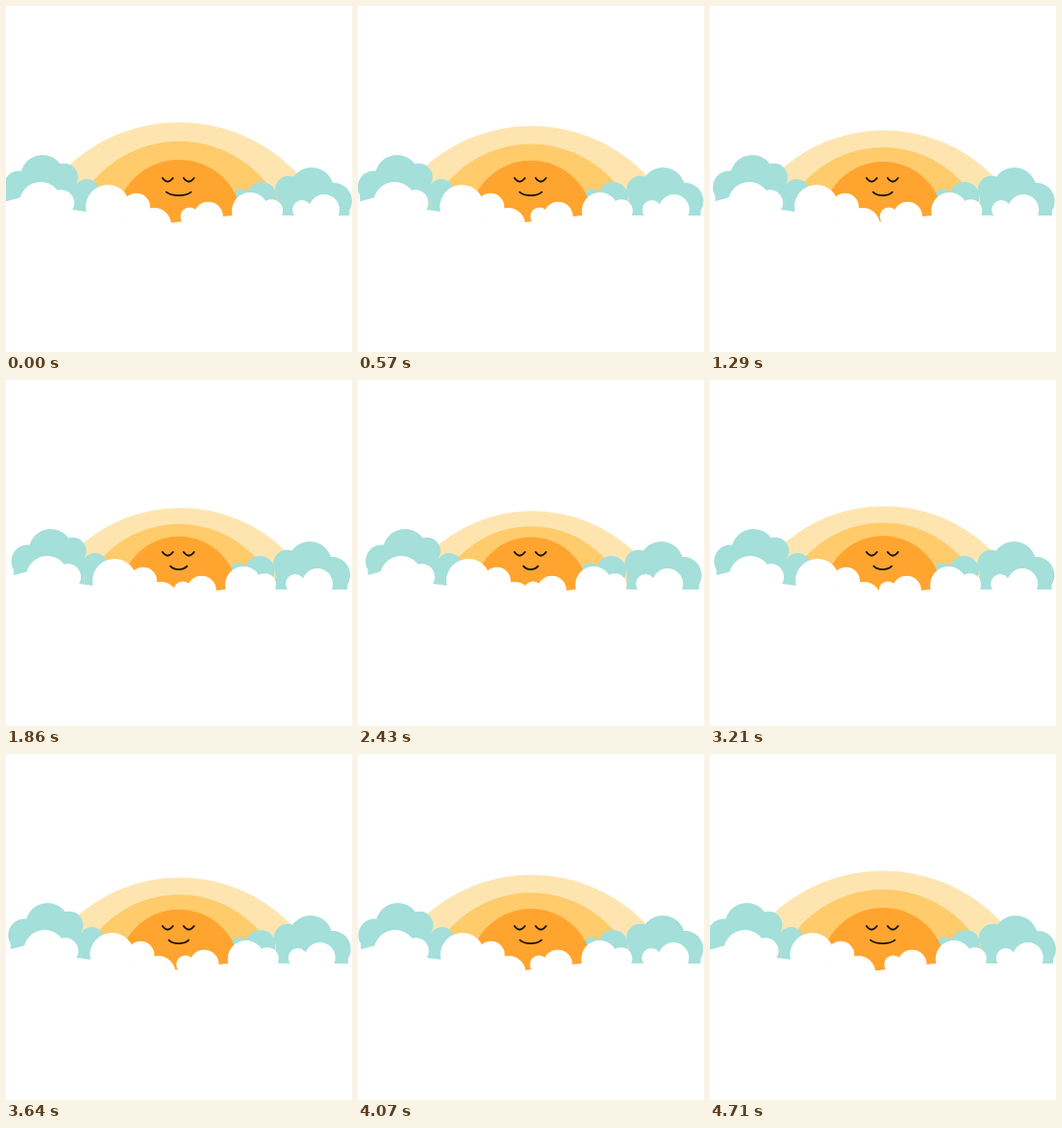
These frames come from a looping animation (360 by 360 pixels, 4.78 s). An HTML page:

```html
<!DOCTYPE html>
<html lang="en">
<head>
<meta charset="utf-8">
<title>Breathing sun</title>
<style>
  html, body { margin: 0; width: 100%; height: 100%; overflow: hidden; background: #fff; }
  svg { display: block; width: 100vw; height: 100vh; }
</style>
</head>
<body>
<svg viewBox="0 0 360 360">
  <circle id="halo" cy="290" fill="#fee5b0"/>
  <circle id="glow" cx="180" cy="258" fill="#ffcb6b"/>
  <g id="tealLeft" fill="#a4dfda"/>
  <g id="tealRight" fill="#a4dfda"/>
  <circle id="sun" cx="180" fill="#ffa42f"/>
  <g fill="none" stroke="#111" stroke-width="1.8" stroke-linecap="round">
    <path id="eye" d="M162.800 179q5.400 7.500 10.900 0"/>
    <use href="#eye" x="22"/>
    <path id="mouth"/>
  </g>
  <g id="whiteLeft" fill="#fff"><path d="M-40 214 18 198.500 69 212 172 226V400H-40Z"/></g>
  <g id="whiteRight" fill="#fff"><path d="M160 227 236 217.700 400 218V400H160Z"/></g>
  <path d="M0 227H360V360H0Z" fill="#fff"/>
</svg>
<script>
  const LOOP = 4780, STEPS = 67, FLOOR = 218;
  const SMALL = 0.62;   // radius of a side puff relative to its main puff
  const drift = { tealLeft: 11, tealRight: -2.5, whiteLeft: 9, whiteRight: -9 };

  const el = id => document.getElementById(id);
  const mix = (a, b, p) => a + (b - a) * p;

  function set(node, attrs) {
    for (const name in attrs) node.setAttribute(name, attrs[name]);
  }

  function add(id, tag, attrs) {
    const node = document.createElementNS("http://www.w3.org/2000/svg", tag);
    set(node, attrs);
    el(id).append(node);
  }

  // Teal puffs also fill the space down to the floor.
  function puff(id, x, y, r) {
    add(id, "circle", { cx: x, cy: y, r });
    if (id.startsWith("teal")) {
      add(id, "rect", { x: x - r * 0.85, y, width: r * 1.7, height: FLOOR - y });
    }
  }

  // A main puff and a side puff whose far edge lies "reach" away from the main centre.
  function pair(id, x, y, r, reach) {
    const small = r * SMALL;
    puff(id, x, y, r);
    puff(id, x + reach - Math.sign(reach) * small, y, small);
  }

  puff("tealLeft", 14, 188.5, 17);
  pair("tealLeft", 38, 178, 23, 37);
  puff("tealLeft", 84, 193, 13);

  puff("tealRight", 244, 202, 11.5);
  puff("tealRight", 266, 198.5, 15.5);
  pair("tealRight", 318, 191, 23, -38);
  puff("tealRight", 341, 203, 19);

  pair("whiteLeft", 36, 205, 22, 35);
  pair("whiteLeft", 106, 209, 23, 44);
  puff("whiteLeft", 154, 228, 18);

  pair("whiteRight", 210.5, 219, 15.3, -29);
  pair("whiteRight", 254, 213, 19, 34);
  pair("whiteRight", 331, 212, 16, -33);

  // p: 0 = breathed in, 1 = breathed out
  function draw(p) {
    set(el("halo"), { cx: mix(180, 181.5, p), r: mix(169, 153.5, p) });
    set(el("glow"), { r: mix(117.3, 105.5, p) });
    set(el("sun"), { cy: mix(226, 223.5, p), r: mix(66, 60, p) });
    for (const id in drift) set(el(id), { transform: `translate(${drift[id] * p} 0)` });

    const w = mix(12.8, 7.5, p);
    set(el("mouth"), { d: `M${179.7 - w} 193.6c${w * 0.45} 4.600 ${w * 1.55} 4.600 ${w * 2} 0` });
  }

  function tick(now) {
    const step = Math.floor((now % LOOP) / LOOP * STEPS + 0.1) % STEPS;
    draw(1 - Math.abs(1 - 2 * step / STEPS));
    requestAnimationFrame(tick);
  }

  draw(0);
  requestAnimationFrame(tick);
</script>
</body>
</html>
```
